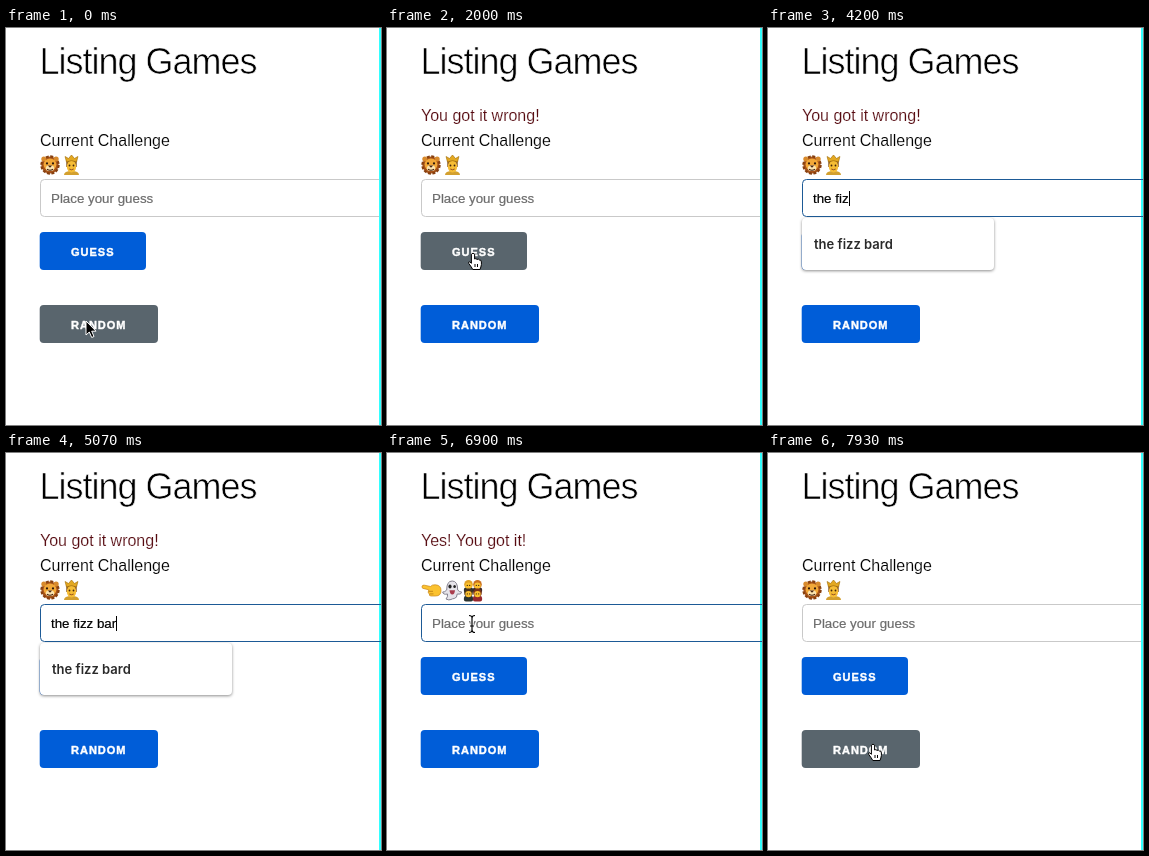
These frames come from a looping animation (375x397 px, 8000 ms). An HTML page:

```html
<!DOCTYPE html>
<html lang="en">
<head>
<meta charset="utf-8">
<title>Listing Games</title>
<style>
  html, body { margin: 0; width: 100%; height: 100%; overflow: hidden; background: #fff; }
  svg { display: block; width: 100%; height: 100%; }
  text { white-space: pre; }
  /* A thin white stroke lightens the regular weight */
  .body { font: 16px "Liberation Sans", Arial, sans-serif; stroke: #fff; stroke-width: .2px; }
  .title { font: 36px "Liberation Sans", Arial, sans-serif; letter-spacing: -1px; stroke: #fff; stroke-width: .7px; }
  .field { font: 13.333px "Liberation Sans", Arial, sans-serif; stroke: currentColor; stroke-width: .2px; }
  .label { font: bold 11px "Liberation Sans", Arial, sans-serif; letter-spacing: 1px; fill: #fff; stroke: #fff; stroke-width: .45px; }
  .row { font: 600 13px Inter, "Liberation Sans", sans-serif; fill: #2a2a2a; }
  #list { filter: drop-shadow(0 1px 1.5px rgba(0, 0, 0, .45)); }
</style>
</head>
<body>
<svg viewBox="0 0 375 397">
  <text class="title" x="33.400" y="46">Listing Games</text>
  <text class="body" id="message" x="34" y="93" fill="#560a10"></text>
  <text class="body" x="34" y="118">Current Challenge</text>

  <g id="lion">
    <circle cx="44" cy="137" r="8.600" fill="#a9541a"/>
    <circle cx="44" cy="137" r="8.600" fill="none" stroke="#87400f" stroke-width="2.200" stroke-dasharray="3 1.500"/>
    <circle cx="37.800" cy="131" r="2.500" fill="#d88a2c"/>
    <circle cx="50.200" cy="131" r="2.500" fill="#d88a2c"/>
    <ellipse cx="44" cy="136.500" rx="6.400" ry="6" fill="#f2a838"/>
    <ellipse cx="44" cy="140.200" rx="4.200" ry="2.900" fill="#fbe4b0"/>
    <circle cx="41" cy="135.400" r="1.100" fill="#2c170b"/>
    <circle cx="47" cy="135.400" r="1.100" fill="#2c170b"/>
    <path d="M41.800 137.400h4.400l-2.200 2.400z" fill="#43200f"/>
    <path d="M41 141.300q3 2 6 0" fill="none" stroke="#43200f" stroke-width="1.100"/>
    <path d="M58 147q0-4 7.500-4t7.500 4z" fill="#d3a02f"/>
    <path d="M60.300 132h10.400v7h-10.400z" fill="#80501f"/>
    <ellipse cx="65.500" cy="138.600" rx="4.700" ry="6" fill="#f6bd35"/>
    <path d="M60.500 134q5-2.600 10 0l1.400-5.500-3.400 2-3-3.500-3 3.500-3.400-2z" fill="#e3a820" stroke="#a8740f" stroke-width=".7"/>
    <circle cx="63.500" cy="137.500" r=".9" fill="#3f240d"/>
    <circle cx="67.500" cy="137.500" r=".9" fill="#3f240d"/>
    <path d="M63.300 141q2.200 1.500 4.400 0" fill="none" stroke="#8a4520" stroke-width=".9"/>
  </g>

  <g id="ghost">
    <path d="M35 133.200q.8-1.400 2.500-1l6 1.300q1.500-2 5-1.700 5.500.4 5.500 5.700 0 5.500-5.500 5.500H44q-2 0-1.600-2-1.800-.8-1-2.800l.4-1.400-5.800-1.400q-1.500-.6-1-2.200z" fill="#fbc22f" stroke="#c98618" stroke-width=".7"/>
    <path d="M41.500 138.300h4.500M42.500 140.900h4" stroke="#b97a14" stroke-width=".8"/>
    <path d="M59 146q2-2 1.500-5-4.500 1-4.800-2 2 .3 4-2 0-9 5.500-9t5.500 9q2 2.300 4 2-.3 3-4.500 2 0 4-3 4.500-2 .2-3.200 1-2 1-5-.5z" fill="#e6e4ea" stroke="#85828f" stroke-width="1"/>
    <ellipse cx="63" cy="133.500" rx="1.600" ry="2" fill="#222"/>
    <ellipse cx="67.600" cy="133.500" rx="1.300" ry="1.600" fill="#222"/>
    <path d="M62.500 137.300h5.500q-.4 4.200-2.700 4.200t-2.800-4.200z" fill="#a93c4c"/>
    <g id="family"></g>
  </g>

  <path d="M374 0V397" stroke="#3ff" stroke-width="2"/>
  <path id="input" fill="none"/>
  <text class="field" id="value" x="45" y="175"></text>
  <path id="caret" stroke="#000"/>

  <rect id="guess" x="33.700" y="204" width="106.300" height="38" rx="4"/>
  <text class="label" x="65" y="228">GUESS</text>
  <rect id="random" x="33.700" y="277" width="118.300" height="38" rx="4"/>
  <text class="label" x="65" y="301">RANDOM</text>

  <g id="list"><rect id="panel" x="34" y="190" width="192" rx="4" fill="#fff"/></g>

  <g id="cursor">
    <path id="arrow" d="M0 0V14L3.300 11 5.700 16.500 8 15.500 5.700 10.200H10z" fill="#000" stroke="#fff"/>
    <path id="hand" d="M-1.600 1.200Q0-1 1.600 1.200V6Q3 5 4 6.400 5.600 5.600 6.400 7 8.400 6.600 8.400 9V11.500Q8 14 7 16.500H-.2Q-1.500 14-4.200 10.500-5 8.600-3.200 8.800L-1.600 10.300ZM2 11v3M4.500 11v3" fill="#fff" stroke="#000"/>
    <g id="beam" fill="none">
      <path d="M-3-8.500Q0-8.500 0-6 0-8.500 3-8.500M0-6V6M-3 8.500Q0 8.500 0 6 0 8.500 3 8.500M-2 2H2" stroke="#fff" stroke-width="3"/>
      <path d="M-3-8.500Q0-8.500 0-6 0-8.500 3-8.500M0-6V6M-3 8.500Q0 8.500 0 6 0 8.500 3 8.500M-2 2H2" stroke="#000" stroke-width="1.200"/>
    </g>
  </g>
</svg>
<script>
const LOOP = 8000;
const BLUE = '#005dd8', GRAY = '#59656d';
const ANSWER = 'the fizz bard';
const TITLES = [ANSWER, 'the fitted lantren', 'the fitted lantern',
  'quiet tin garden', 'seven odd kettles', 'cold plum river'];
const KEYS = [3000, 3300, 3400, 3500, 3570, 3670, 3770, 4230, 4370, 4730, 4930, 5070, 5200];

const FOCUS = [[0, 'random'], [600, 'guess'], [2570, 'input'], [7450, 'random']];
const MESSAGE = [[0, ''], [600, 'You got it wrong!'], [5400, 'Yes! You got it!'], [7470, '']];
const PUZZLE = [[0, 'lion'], [5400, 'ghost'], [7830, 'lion']];
const ROWS = [[0, 0], [2670, 6], [3100, 3], [3870, 1], [5330, 0]];
const PATH = [
  [0, 80, 293], [30, 80, 293], [170, 84, 215], [240, 85, 182], [330, 86, 224],
  [800, 86, 225], [1000, 125, 185], [1130, 163, 125], [1280, 145, 96],
  [1500, 75, 95], [1680, 125, 100], [1970, 86, 225],
  [2400, 86, 225], [2560, 85, 154], [6870, 85, 154], [6900, 85, 171],
  [7150, 94, 225], [7400, 105, 291]
];

const $ = id => document.getElementById(id);
const show = (el, on) => el.setAttribute('display', on ? 'inline' : 'none');
const set = (el, name, value) => el.setAttribute(name, value);
const stepAt = (steps, t) => steps.filter(s => s[0] <= t).pop()[1];

function add(parent, tag, attrs, text = '') {
  const el = document.createElementNS('http://www.w3.org/2000/svg', tag);
  for (const name in attrs) set(el, name, attrs[name]);
  el.textContent = text;
  return parent.appendChild(el);
}

const rows = TITLES.map((title, i) =>
  add($('list'), 'text', { class: 'row', x: 46, y: 221 + 36 * i }, title));

function person(x, y, hair, coat) {
  const g = $('family');
  add(g, 'rect', { x: x - 4.6, y: y + 2.5, width: 9.2, height: 5.5, rx: 2, fill: coat });
  add(g, 'circle', { cx: x, cy: y - .6, r: 4.3, fill: hair });
  add(g, 'circle', { cx: x, cy: y + .6, r: 3.2, fill: '#fbc02d' });
  for (const dx of [-1.2, 1.2]) add(g, 'circle', { cx: x + dx, cy: y + .4, r: .6, fill: '#321' });
}
person(81.5, 132, '#e0a126', '#2b332f');
person(90.5, 132, '#c9701f', '#3b2a2a');
person(81.5, 140.5, '#4a3219', '#2b332f');
person(90.5, 140.5, '#7a3417', '#96282e');

function pointer(t) {
  const i = PATH.findIndex(p => p[0] > t);
  if (i < 0) return PATH[PATH.length - 1].slice(1);
  const [t0, x0, y0] = PATH[i - 1], [t1, x1, y1] = PATH[i];
  const k = (t - t0) / (t1 - t0), e = k * k * (3 - 2 * k);
  return [x0 + (x1 - x0) * e, y0 + (y1 - y0) * e];
}

function caretOn(t) {
  if (t < 2570 || t >= 7450) return false;
  return t < 5400 || Math.floor((t - 5400) / 500) % 2 === 0;
}

function draw(t) {
  const focus = stepAt(FOCUS, t), count = stepAt(ROWS, t), puzzle = stepAt(PUZZLE, t);
  const focused = focus === 'input';
  $('message').textContent = stepAt(MESSAGE, t);
  show($('lion'), puzzle === 'lion');
  show($('ghost'), puzzle === 'ghost');

  // Pointer and what lies under it
  const [x, y] = pointer(t);
  const visible = t < 3000 || t >= 6900;
  const inside = (l, top, r, b) => visible && x >= l && x <= r && y >= top && y <= b;
  const over = {
    guess: inside(34, 204, 140, 242),
    random: inside(34, 277, 152, 315),
    text: inside(34, 151, 375, 189) || inside(34, 82, 155, 120)
  };
  const kind = t < 30 ? 'arrow' : over.text ? 'beam' : over.guess || over.random ? 'hand' : 'arrow';
  show($('cursor'), visible);
  set($('cursor'), 'transform', `translate(${x} ${y})`);
  for (const id of ['arrow', 'hand', 'beam']) show($(id), id === kind);
  for (const id of ['guess', 'random']) set($(id), 'fill', focus === id || over[id] ? GRAY : BLUE);

  // Input
  const edge = focused ? 375 : 373;
  set($('input'), 'd', `M${edge} 151.500H38.500q-4 0-4 4V184.500q0 4 4 4H${edge}`);
  set($('input'), 'stroke', focused ? '#1d5a96' : '#c9c9c9');
  const typed = t < 5400 ? ANSWER.slice(0, KEYS.filter(k => k <= t).length) : '';
  const value = $('value');
  value.textContent = typed || 'Place your guess';
  value.style.color = value.style.fill = typed ? '#000' : '#6c6c6c';
  const cx = 45.5 + (typed ? Math.round(value.getComputedTextLength()) : 0);
  set($('caret'), 'd', `M${cx} 163V178`);
  show($('caret'), caretOn(t));

  // Suggestions
  show($('list'), count > 0);
  set($('panel'), 'height', 16 + 36 * count);
  rows.forEach((row, i) => show(row, i < count));
}

const start = performance.now();
function tick() {
  draw((performance.now() - start) % LOOP);
  requestAnimationFrame(tick);
}
tick();
</script>
</body>
</html>
```
